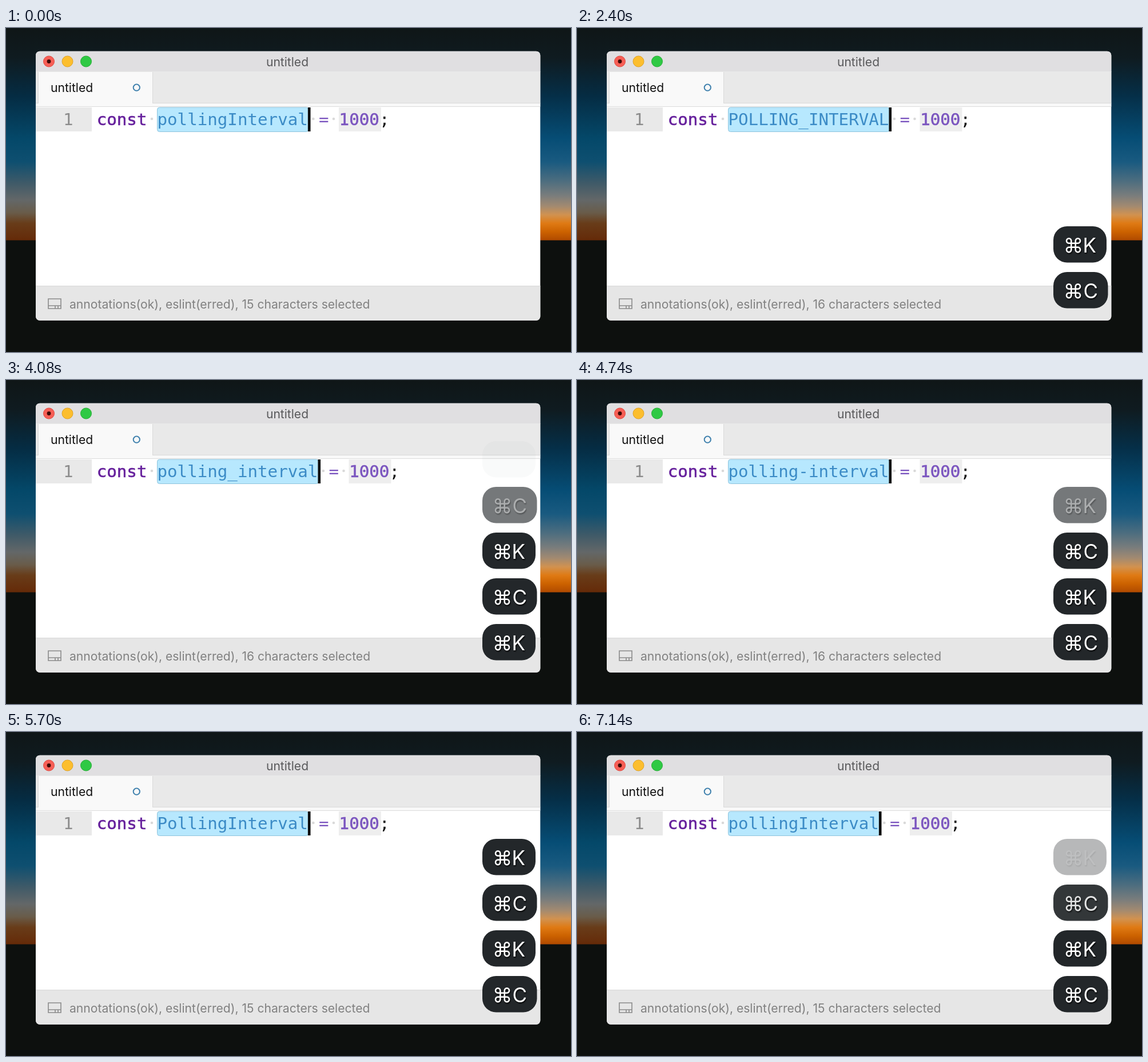
Recreate the animation shown at these times as an HTML page. Size 988 by 567 pixels, loop 7200 ms.

```html
<!DOCTYPE html>
<html lang="en">
<head>
<meta charset="utf-8">
<title>Case cycling</title>
<style>
  html, body { margin: 0; width: 100%; height: 100%; overflow: hidden; background: #0d100e; }
  svg { display: block; width: 988px; height: 567px; }
  text { white-space: pre; }
  .ui { font: 21.1px Inter, "Open Sans", sans-serif; }
  .code { font: 29.17px "DejaVu Sans Mono", "Noto Sans Mono", monospace; }
  .strong { stroke-width: .6; }
  .key { font: 35px Inter, "DejaVu Sans", sans-serif; fill: #fff; text-shadow: 1px 2px 2px rgba(0, 0, 0, .8); }
</style>
</head>
<body>
<svg id="stage" viewBox="0 0 988 567">
  <defs>
    <linearGradient id="skyLeft" x1="0" y1="0" x2="0" y2="1">
      <stop offset="0" stop-color="#0f1617"/>
      <stop offset=".14" stop-color="#0f1b20"/>
      <stop offset=".32" stop-color="#052c43"/>
      <stop offset=".52" stop-color="#044869"/>
      <stop offset=".63" stop-color="#0e4f70"/>
      <stop offset=".73" stop-color="#3f5a68"/>
      <stop offset=".81" stop-color="#636768"/>
      <stop offset=".87" stop-color="#695c4a"/>
      <stop offset=".92" stop-color="#683c19"/>
      <stop offset="1" stop-color="#652a08"/>
    </linearGradient>
    <linearGradient id="skyRight" x1="0" y1="0" x2="0" y2="1">
      <stop offset="0" stop-color="#0f1617"/>
      <stop offset=".14" stop-color="#0f1b20"/>
      <stop offset=".32" stop-color="#052f48"/>
      <stop offset=".52" stop-color="#064d75"/>
      <stop offset=".63" stop-color="#195a80"/>
      <stop offset=".72" stop-color="#4c6d7f"/>
      <stop offset=".79" stop-color="#7a7d7c"/>
      <stop offset=".84" stop-color="#a38a70"/>
      <stop offset=".88" stop-color="#d19250"/>
      <stop offset=".92" stop-color="#df7a14"/>
      <stop offset=".96" stop-color="#cc6200"/>
      <stop offset="1" stop-color="#b04a00"/>
    </linearGradient>
    <clipPath id="frame"><rect x="52" y="40.7" width="882.3" height="471" rx="7"/></clipPath>
  </defs>

  <rect width="988" height="567" fill="#0d100e"/>
  <rect width="494" height="371.5" fill="url(#skyLeft)"/>
  <rect x="494" width="494" height="371.5" fill="url(#skyRight)"/>

  <g clip-path="url(#frame)">
    <rect x="52" y="40" width="883" height="472" fill="#fff"/>
    <rect x="52" y="40" width="883" height="37" fill="#e0dfe1"/>
    <rect x="52" y="76" width="883" height="56" fill="#e9e9e9"/>
    <rect x="52" y="131" width="883" height="1" fill="#d9d9d9"/>
    <rect x="52" y="132" width="883" height="5" fill="#f9f9f9"/>
    <rect x="56" y="77" width="201" height="55" fill="#d9d9d9"/>
    <rect x="57" y="77" width="199" height="56" fill="#f9f9f9"/>
    <rect x="52" y="137" width="883" height="1" fill="#dcdcdc"/>
    <rect x="52" y="139" width="98" height="42" fill="#e9e9e9"/>
    <rect x="52" y="451" width="883" height="61" fill="#e6e6e6"/>
    <rect x="52" y="451" width="883" height="1" fill="#d8d8d8"/>
  </g>

  <g stroke-width="1">
    <circle cx="75" cy="58.5" r="9.5" fill="#f75f56" stroke="#df4a42"/>
    <circle cx="107.5" cy="58.5" r="9.5" fill="#fcbe2e" stroke="#dfa226"/>
    <circle cx="140" cy="58.5" r="9.5" fill="#2fc944" stroke="#25ac35"/>
    <circle cx="75" cy="58.5" r="3.4" fill="#3d0a06"/>
  </g>
  <g class="ui">
    <text x="492" y="66.5" text-anchor="middle" fill="#59595b">untitled</text>
    <text x="78" y="112.3" fill="#111">untitled</text>
    <text id="status" x="111" y="490.5" fill="#808080"></text>
  </g>
  <circle cx="228.3" cy="104.2" r="5.6" fill="none" stroke="#3f80ad" stroke-width="2"/>
  <path d="M74 474H96V491H74ZM74 486H96M86 486V491M91 486V491" fill="none" stroke="#8b8b8b" stroke-width="1.6"/>

  <g class="code">
    <text x="100" y="170" fill="#8c8c8c">1</text>
    <text class="strong" x="158.7" y="170" fill="#66209c" stroke="#66209c">const</text>
    <circle cx="255" cy="159" r="2.3" fill="#d9d9d9"/>
    <rect id="selection" x="264.5" y="139" height="42.5" rx="4" fill="#b7e8fe" stroke="#8fc3dc"/>
    <text id="word" x="264.5" y="170" fill="#3b8bc6"></text>
    <g id="tail">
      <rect y="139" width="4.6" height="42" fill="#0b0b0b"/>
      <circle cx="9.5" cy="159" r="2.3" fill="#d9d9d9"/>
      <circle cx="45" cy="159" r="2.3" fill="#d9d9d9"/>
      <rect x="54" y="139" width="74" height="42" fill="#eee"/>
      <text x="19" y="170" fill="#7b55bf">=</text>
      <text class="strong" x="54.7" y="170" fill="#7b55bf" stroke="#7b55bf">1000</text>
      <text x="125" y="170" fill="#111">;</text>
    </g>
  </g>
  <g id="keys"></g>
</svg>

<script>
  const LOOP = 7200, STEP = 60;
  const HOLD = 1725, FADE = 200;       // key badge life, ms
  const ADVANCE = 17.56, WORD_X = 264.5;
  const BOTTOM = 427, PITCH = 80, CHORD_GAP = 120;

  // Each chord is Cmd-K, then Cmd-C, which turns the word into its next case.
  const START = "pollingInterval";
  const chords = [
    [2160, "POLLING_INTERVAL"],
    [2940, "polling_interval"],
    [4020, "polling-interval"],
    [5280, "PollingInterval"],
    [6300, "pollingInterval"]
  ];

  const byId = id => document.getElementById(id);

  function add(parent, tag, attrs, text = "") {
    const node = document.createElementNS("http://www.w3.org/2000/svg", tag);
    for (const name in attrs) node.setAttribute(name, attrs[name]);
    node.textContent = text;
    return parent.appendChild(node);
  }

  function makeKey(letter, at) {
    const group = add(byId("keys"), "g", {});
    const badge = add(group, "rect", {
      x: 833, width: letter === "K" ? 93 : 95.5, height: 63.5, rx: 24, fill: "#23272a"
    });
    const label = add(group, "g", { class: "key" });
    add(label, "text", { x: 868, y: 45.5, "text-anchor": "middle" }, "⌘");
    add(label, "text", { x: letter === "K" ? 884.5 : 885.5, y: 45.5 }, letter);
    return { at, group, badge, label };
  }

  const keys = chords.flatMap(([at]) => [makeKey("K", at), makeKey("C", at + CHORD_GAP)]);

  function showWord(t) {
    const done = chords.filter(([at]) => t >= at + CHORD_GAP);
    const word = done.length ? done[done.length - 1][1] : START;
    const width = word.length * ADVANCE;
    byId("word").textContent = word;
    byId("selection").setAttribute("width", width + 1);
    byId("tail").setAttribute("transform", `translate(${WORD_X + width} 0)`);
    byId("status").textContent =
      `annotations(ok), eslint(erred), ${word.length} characters selected`;
  }

  function showKeys(t) {
    const pressed = keys.filter(key => t >= key.at).length;
    keys.forEach((key, i) => {
      const age = t - key.at;
      const alpha = age < 0 ? 0 : Math.max(0, Math.min(1, 1 - (age - HOLD) / FADE));
      const y = BOTTOM - PITCH * (pressed - 1 - i);
      key.group.setAttribute("visibility", alpha ? "visible" : "hidden");
      key.group.setAttribute("transform", `translate(0 ${y})`);
      key.badge.setAttribute("opacity", alpha);
      key.label.setAttribute("opacity", alpha * alpha);
    });
  }

  const begin = performance.now();

  function draw() {
    const elapsed = (performance.now() - begin) % LOOP;
    const t = Math.floor(elapsed / STEP) * STEP;
    showWord(t);
    showKeys(t);
    requestAnimationFrame(draw);
  }
  draw();
</script>
</body>
</html>
```
